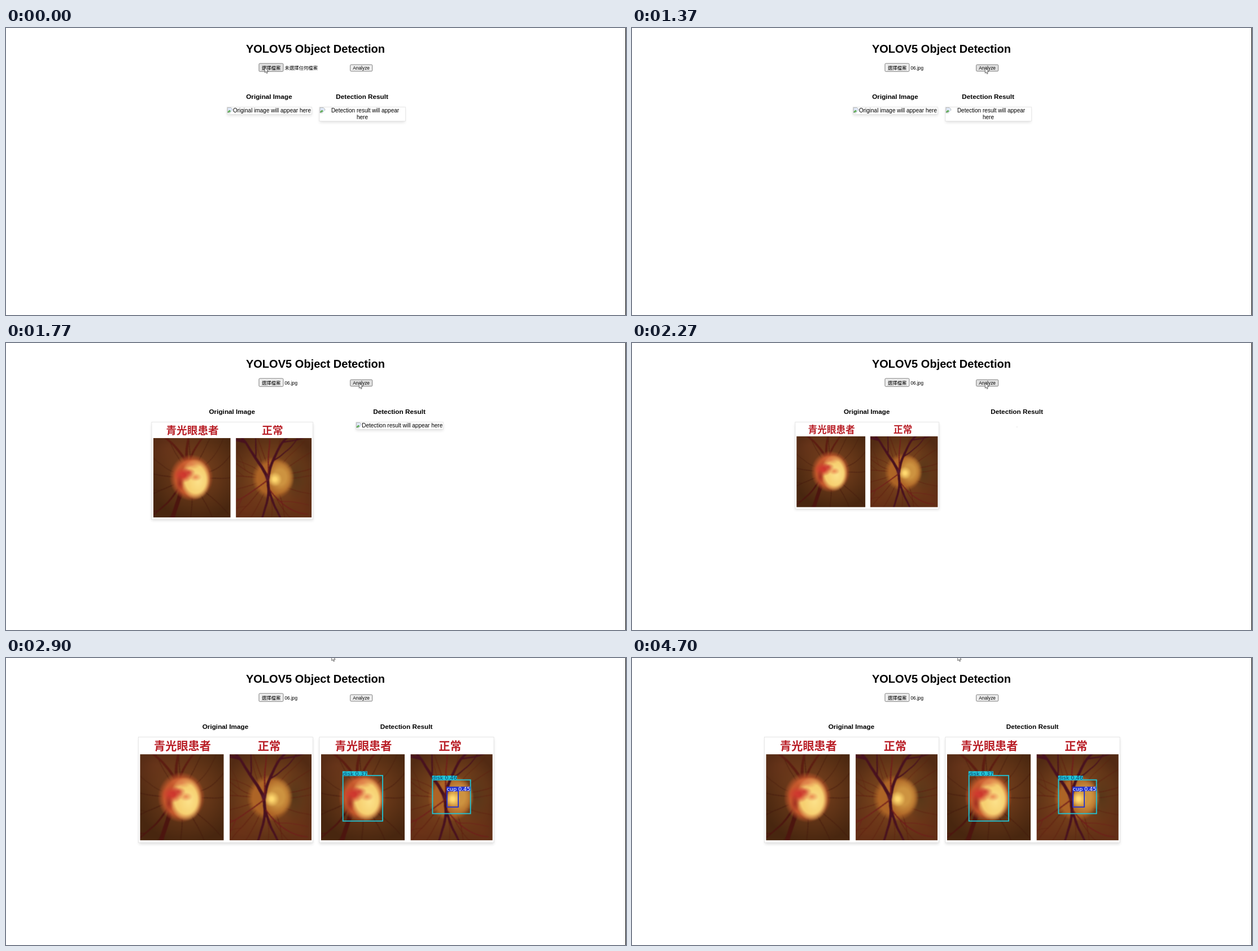
Animation of 1098 by 510 pixels, one loop 5.71 s. Source, as an HTML page with a canvas:

```html
<!DOCTYPE html>
<html lang="zh-Hant">
<head>
<meta charset="utf-8">
<title>YOLOV5 Object Detection</title>
<style>
  html, body { margin: 0; width: 100%; height: 100%; overflow: hidden; background: #fff; }
  canvas { display: block; }
</style>
</head>
<body>
<canvas id="stage" width="1098" height="510"></canvas>
<script>
const LOOP = 5710;
const SANS = '"Liberation Sans", Arial, sans-serif';
const CJK = '"Noto Sans CJK TC", "Noto Sans CJK JP", "Noto Sans CJK", sans-serif';
const BODY = '10.03px ' + SANS;
const SMALL = '8.36px ';
const TOP = 140.5;     // upper edge of both result cards
const LEFT_END = 543.5; // right edge of the left picture
const RIGHT = 555;     // left edge of the right card
const PIC = { w: 309, h: 187.5 };
const ctx = document.getElementById('stage').getContext('2d');

// ---- eye picture: painted once at double size ----

function random(seed) {
  return () => (seed = seed * 16807 % 2147483647) / 2147483647;
}

function layer() {
  const canvas = document.createElement('canvas');
  canvas.width = PIC.w * 2;
  canvas.height = PIC.h * 2;
  const c = canvas.getContext('2d');
  c.scale(2, 2);
  c.lineCap = 'round';
  return c;
}

// Soft ellipse, solid up to the core fraction of its radius.
function glow(c, color, x, y, rx, ry, core = 0) {
  c.save();
  c.translate(x, y);
  c.scale(rx, ry);
  const g = c.createRadialGradient(0, 0, core, 0, 0, 1);
  g.addColorStop(0, color);
  g.addColorStop(1, color.slice(0, 7) + '00');
  c.fillStyle = g;
  c.fillRect(-1, -1, 2, 2);
  c.restore();
}

// Tapering vessel that bends by curl degrees per step and forks at random.
function vessel(c, rnd, x, y, angle, curl, width, length) {
  const step = 5;
  for (let d = 0; d < length; d += step) {
    const a = angle * Math.PI / 180;
    const nx = x + Math.cos(a) * step;
    const ny = y + Math.sin(a) * step;
    c.lineWidth = width * (1 - 0.45 * d / length);
    c.beginPath();
    c.moveTo(x, y);
    c.lineTo(nx, ny);
    c.stroke();
    [x, y] = [nx, ny];
    angle += curl + (rnd() - 0.5) * 9;
    if (width > 1.5 && d > 20 && rnd() < 0.09) {
      const side = rnd() < 0.5 ? -1 : 1;
      vessel(c, rnd, x, y, angle + side * 38, -side, width * 0.45, length * 0.6);
    }
  }
}

function fineVessels(c, rnd, x, y, inner, count) {
  for (let i = 0; i < count; i++) {
    const deg = (i + rnd() * 0.8) * 360 / count;
    const a = deg * Math.PI / 180;
    vessel(c, rnd, x + Math.cos(a) * inner, y + Math.sin(a) * inner,
      deg, (rnd() - 0.5) * 4, 1 + rnd() * 0.8, 80);
  }
}

function paintGlaucoma(c) {
  const rnd = random(71);
  glow(c, '#6b341cb0', 30, 50, 80, 60);
  glow(c, '#7a421edd', 84, 96, 92, 92, 0.2);
  c.strokeStyle = '#42160e88';
  fineVessels(c, rnd, 76, 108, 36, 13);
  c.strokeStyle = '#5c1d11dd';
  vessel(c, rnd, 66, 77, -118, -2.5, 5, 90);
  vessel(c, rnd, 68, 76, -98, 2.5, 5.5, 70);
  vessel(c, rnd, 72, 76, -68, 2, 4, 95);
  c.strokeStyle = '#4c150fee';
  vessel(c, rnd, 59, 122, 108, 0, 8, 80);
  vessel(c, rnd, 56, 122, 100, 0, 6, 80);
  vessel(c, rnd, 52, 126, 122, 1, 3.5, 80);
  glow(c, '#c4582c', 76, 107, 42, 45, 0.72);
  glow(c, '#f6cf70', 84, 110, 29, 39, 0.68);
  glow(c, '#fbe088', 89, 114, 20, 26, 0.1);
  glow(c, '#e07a48cc', 76, 81, 19, 10);
  glow(c, '#e8804cdd', 84, 106, 12, 8);
  glow(c, '#cf3a2e', 60, 102, 19, 15, 0.25);
  glow(c, '#c8302ccc', 70, 97, 14, 9);
  glow(c, '#9c2a20cc', 54, 118, 8, 16);
}

function paintNormal(c) {
  const rnd = random(1234);
  glow(c, '#874d20', 232, 106, 90, 88, 0.15);
  glow(c, '#743418b0', 178, 168, 62, 55);
  glow(c, '#743418a0', 290, 168, 60, 50);
  glow(c, '#4a3218aa', 276, 106, 24, 45);
  c.strokeStyle = '#5d1a1199';
  fineVessels(c, rnd, 226, 108, 20, 17);
  glow(c, '#ad6426', 233, 108, 41, 41, 0.75);
  glow(c, '#cd9340', 246, 106, 27, 33, 0.45);
  glow(c, '#ffd970', 236, 110, 14, 14, 0.2);
  c.strokeStyle = '#48111fee';
  vessel(c, rnd, 222, 108, -112, -1.6, 6, 110);
  vessel(c, rnd, 223, 108, -80, 2.2, 5.5, 120);
  vessel(c, rnd, 222, 106, 85, 1.5, 5.5, 90);
  vessel(c, rnd, 223, 122, 78, -1, 5, 80);
  c.strokeStyle = '#701c1ccc';
  vessel(c, rnd, 224, 102, -92, 0.5, 3, 85);
  vessel(c, rnd, 222, 112, 145, 1, 2.4, 80);
  vessel(c, rnd, 226, 130, 55, -2, 2.4, 90);
  glow(c, '#5c1c34cc', 222, 107, 6, 8);
}

function panel(c, x, w, base, paint) {
  const sheet = layer();
  sheet.fillStyle = base;
  sheet.fillRect(0, 0, PIC.w, PIC.h);
  paint(sheet);
  c.save();
  c.beginPath();
  c.rect(x, 30.6, w, 152.8);
  c.clip();
  c.filter = 'blur(1.8px)';
  c.drawImage(sheet.canvas, 0, 0, PIC.w, PIC.h);
  c.restore();
}

const picture = layer();
panel(picture, 3, 148, '#48260f', paintGlaucoma);
panel(picture, 161.6, 145, '#522a13', paintNormal);

// ---- page parts ----

function text(str, x, y, font, color = '#000', align = 'center') {
  ctx.font = font;
  ctx.fillStyle = color;
  ctx.textAlign = align;
  ctx.fillText(str, x, y);
}

function card(x, w, h) {
  ctx.save();
  ctx.shadowColor = 'rgba(0,0,0,.12)';
  ctx.shadowBlur = 5;
  ctx.shadowOffsetY = 2.5;
  ctx.fillStyle = '#fff';
  ctx.fillRect(x, TOP, w, h);
  ctx.restore();
  ctx.strokeStyle = '#ddd';
  ctx.lineWidth = 0.7;
  ctx.strokeRect(x, TOP, w, h);
}

function button(x, y, w, h, hover) {
  ctx.beginPath();
  ctx.roundRect(x, y, w, h, 1.6);
  ctx.fillStyle = hover ? '#e1e1e1' : '#efefef';
  ctx.fill();
  ctx.strokeStyle = '#707070';
  ctx.lineWidth = 0.9;
  ctx.stroke();
}

function shape(path, fill, stroke) {
  const p = new Path2D(path);
  ctx.fillStyle = fill;
  ctx.fill(p);
  ctx.strokeStyle = stroke;
  ctx.lineWidth = 0.75;
  ctx.stroke(p);
}

function brokenIcon(x) {
  ctx.save();
  ctx.translate(x, TOP + 0.3);
  shape('M.6 .6h6l2.8 2.8v6.6h-8.8z', '#dfe8f6', '#a3a3a3');
  shape('M1.4 9.2v-1.6l2.8-2.4 2 2z', '#58a84a', '#58a84a');
  shape('M5 11l5.2-5.6v5.6z', '#fff', '#fff');
  ctx.restore();
}

function cursor([x, y]) {
  ctx.save();
  ctx.translate(x, y);
  shape('M.3 .3v8.9l2-1.8 1.4 3.2 1.5-.7-1.3-3 2.8-.1z', '#fff', '#333');
  ctx.restore();
}

function heading(str, x, w) {
  text(str, x + w / 2 - 0.5, 125.6, 'bold 11.74px ' + SANS);
}

// Card around a missing picture with its description on one line.
function missing(str, x, w) {
  card(x, w, 12.8);
  brokenIcon(x + 0.2);
  text(str, x + 10.4, 150.2, BODY, '#000', 'left');
}

function eyePicture(x, w) {
  const s = w / PIC.w;
  card(x, w, PIC.h * s);
  ctx.save();
  ctx.translate(x, TOP);
  ctx.scale(s, s);
  ctx.drawImage(picture.canvas, 0, 0, PIC.w, PIC.h);
  text('青光眼患者', 78, 23.4, 'bold 20.2px ' + CJK, '#b91f27');
  text('正常', 231.5, 23.4, 'bold 20.2px ' + CJK, '#b91f27');
  ctx.restore();
}

function original(w) {
  heading('Original Image', LEFT_END - w, w);
  eyePicture(LEFT_END - w, w);
}

function detection(label, x, y, w, h, color, ink) {
  ctx.font = '9.55px "DejaVu Sans", sans-serif';
  const labelW = ctx.measureText(label).width + 0.5;
  ctx.strokeStyle = color;
  ctx.lineWidth = 1.8;
  ctx.strokeRect(x, y, w, h);
  ctx.fillStyle = color;
  ctx.fillRect(x - 0.8, y - 7.6, labelW, 7.8);
  text(label, x - 0.4, y - 0.2, ctx.font, ink, 'left');
}

// ---- timeline ----

const mix = (a, b, k) => a.map((v, i) => v + (b[i] - v) * k);
const ease = k => k * k * (3 - 2 * k);

// Progress from start to end, advancing in equal steps.
function steps(t, start, end, count) {
  const n = Math.floor((t - start) / (end - start) * (count - 1)) + 1;
  return Math.max(0, Math.min(1, n / count));
}

function cursorAt(t) {
  const choose = [458, 70], dialog = [458, 187], analyze = [625, 71], away = [576.5, -4.5];
  if (t < 1010) return choose;
  if (t < 2580) return mix(dialog, analyze, ease(steps(t, 1010, 1370, 10)));
  return mix(analyze, away, ease(steps(t, 2580, 2900, 7)));
}

function results(t) {
  if (t < 1700) {
    heading('Original Image', 391.5, 150);
    missing('Original image will appear here', 391.5, 150);
    heading('Detection Result', RIGHT, 152.3);
    card(RIGHT, 152.3, 24.8);
    brokenIcon(RIGHT + 0.4);
    text('Detection result will appear', 636, 150.2, BODY);
    text('here', 631, 162.2, BODY);
  } else if (t < 2270) {
    original(285.5);
    heading('Detection Result', 619.8, 154.4);
    missing('Detection result will appear here', 619.8, 154.4);
  } else if (t < 2300) {
    original(254.5);
    heading('Detection Result', 682, 0);
    ctx.fillStyle = '#e4e4e4';
    ctx.fillRect(681, 148.5, 1.5, 1.5);
  } else {
    original(PIC.w);
    heading('Detection Result', RIGHT, PIC.w);
    eyePicture(RIGHT, PIC.w);
    detection('disk 0.37', 596.7, 208.8, 70.3, 80.9, '#20c5d8', '#123c68');
    detection('disk 0.46', 755.4, 216.6, 67.2, 59.9, '#20c5d8', '#123c68');
    detection('cup 0.45', 781, 236.2, 20, 28.6, '#2232d2', '#fff');
  }
}

function draw(t) {
  const pos = cursorAt(t);
  const onButtons = pos[1] > 63 && pos[1] < 77;
  ctx.fillStyle = '#fff';
  ctx.fillRect(0, 0, 1098, 510);
  ctx.fillStyle = '#000';
  ctx.fillRect(1097, 0, 1, 510);

  text('YOLOV5 Object Detection', 548, 44.4, 'bold 20.06px ' + SANS);
  button(448, 63, 43, 14.3, onButtons && pos[0] < 491);
  text('選擇檔案', 469.6, 73.7, SMALL + CJK);
  if (t < 1010) text('未選擇任何檔案', 493.6, 73.7, SMALL + CJK, '#000', 'left');
  else text('06.jpg', 493.4, 73.7, SMALL + SANS, '#000', 'left');
  button(609.7, 65.2, 39, 11.6, onButtons && pos[0] > 609);
  text('Analyze', 629.1, 73.8, SMALL + SANS);

  results(t);
  cursor(pos);
}

const begin = performance.now();
function tick() {
  draw((performance.now() - begin) % LOOP);
  requestAnimationFrame(tick);
}
tick();
</script>
</body>
</html>
```
